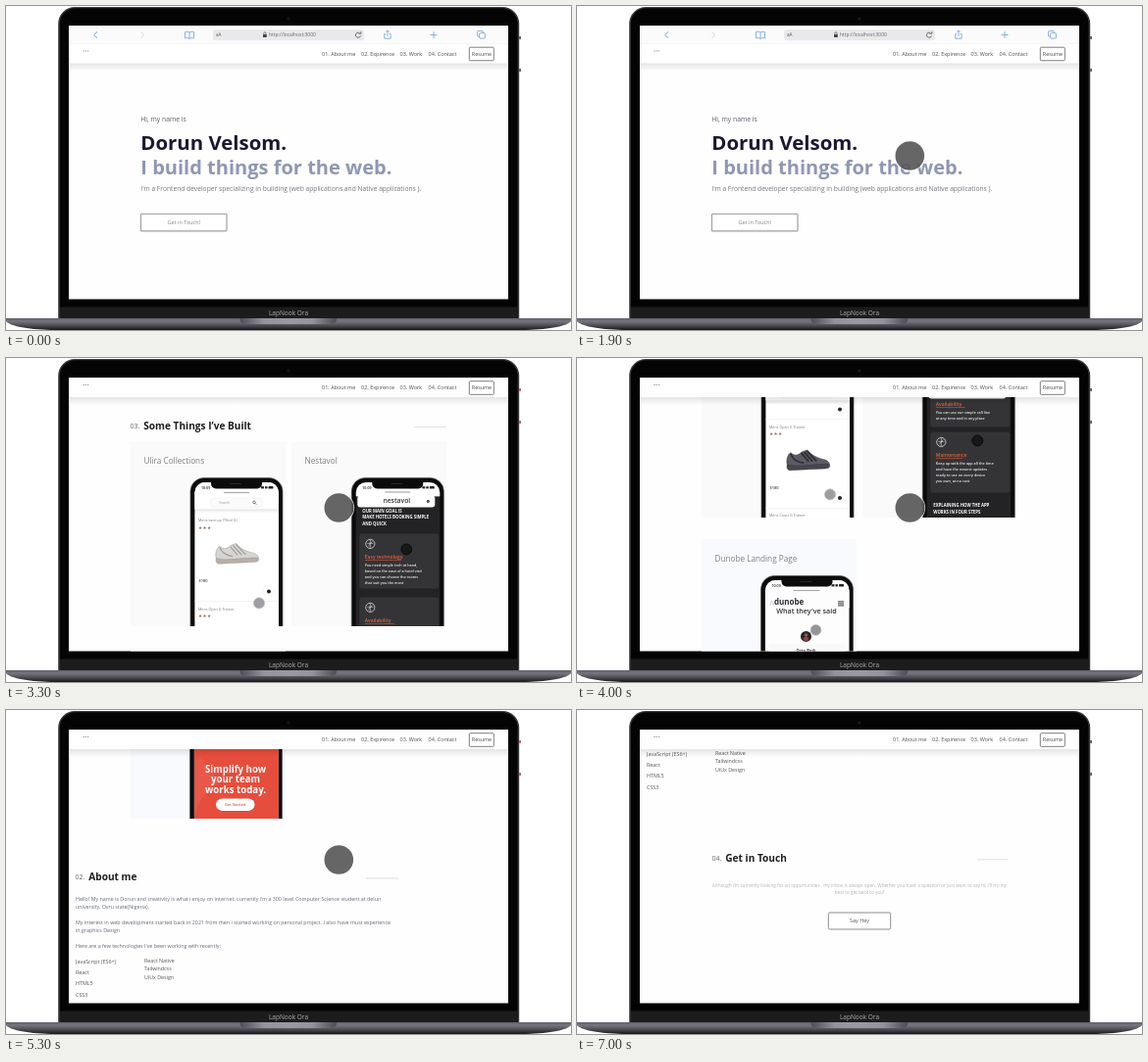
Animation, 576 px wide and 331 px high, one loop 7800 ms. Source, as an HTML page with a canvas:

```html
<!DOCTYPE html>
<html lang="en">
<head>
<meta charset="utf-8">
<title>Portfolio scroll</title>
<style>
html, body { margin: 0; width: 100%; height: 100%; overflow: hidden; background: #fff; }
canvas { display: block; width: 100vw; height: 100vh; filter: blur(0.35px); }
</style>
</head>
<body>
<canvas id="stage"></canvas>
<script>
const W = 576, H = 331, LOOP = 7800, STEP = 100, LAST = 7000;
const canvas = document.getElementById('stage');
const ctx = canvas.getContext('2d');
const scale = window.devicePixelRatio || 1;
canvas.width = W * scale;
canvas.height = H * scale;

// Tracks: [time, value] pairs, linear in between.
const WORK = 280;
const pageScroll = [[2000, 0], [2500, 200], [2600, 200], [3200, WORK], [3400, WORK], [4000, 391],
  [4600, 514], [5300, 654], [5800, 793], [6100, 793], [6400, 866]];
const shopScroll = [[3300, 0], [4000, 75], [4600, 130]];
const hotelScroll = [[3300, 0], [4000, 110]];
const landingScroll = [[4000, 0], [4600, 20], [5300, 90]];
const touchAlpha = [[1400, 0], [1700, 1], [6700, 1], [7000, 0]];

function track(keys, t) {
  if (t <= keys[0][0]) return keys[0][1];
  for (let i = 1; i < keys.length; i++) {
    const [t0, v0] = keys[i - 1], [t1, v1] = keys[i];
    if (t <= t1) return v0 + (v1 - v0) * (t - t0) / (t1 - t0);
  }
  return keys[keys.length - 1][1];
}

function text(str, x, y, size, color = '#666', weight = 400, align = 'left') {
  ctx.font = `${weight} ${size}px "Open Sans", "Noto Sans", sans-serif`;
  ctx.textAlign = align;
  ctx.textBaseline = 'middle';
  ctx.fillStyle = color;
  ctx.fillText(str, x, y);
}
function lines(list, x, y, gap, ...style) {
  list.forEach((str, i) => text(str, x, y + i * gap, ...style));
}
function rect(x, y, w, h, color) {
  ctx.fillStyle = color;
  ctx.fillRect(x, y, w, h);
}
function box(x, y, w, h, r, fill, stroke, width = 1) {
  ctx.beginPath();
  ctx.roundRect(x, y, w, h, r);
  if (fill) { ctx.fillStyle = fill; ctx.fill(); }
  if (stroke) { ctx.strokeStyle = stroke; ctx.lineWidth = width; ctx.stroke(); }
}
function disc(x, y, r, fill, stroke, width = 1) {
  box(x - r, y - r, 2 * r, 2 * r, r, fill, stroke, width);
}
function path(d, color, width = 0.8, fill) {
  const p = new Path2D(d);
  if (fill) { ctx.fillStyle = fill; ctx.fill(p); }
  if (color) { ctx.strokeStyle = color; ctx.lineWidth = width; ctx.stroke(p); }
}
function gradient(x0, y0, x1, y1, ...stops) {
  const g = ctx.createLinearGradient(x0, y0, x1, y1);
  stops.forEach((color, i) => g.addColorStop(i / (stops.length - 1), color));
  return g;
}
function fade(x, y, w, h, from, to) {
  rect(x, y, w, h, gradient(0, y, 0, y + h, from, to));
}
function at(x, y, draw) {
  ctx.save();
  ctx.translate(x, y);
  draw();
  ctx.restore();
}
function clipTo(x, y, w, h, r = 0) {
  ctx.beginPath();
  ctx.roundRect(x, y, w, h, r);
  ctx.clip();
}

function laptop(t) {
  box(53.2, 1, 470, 321, [17, 17, 0, 0], '#3a3a3d');
  box(54.8, 2.2, 466.800, 318, [15.5, 15.5, 0, 0], '#040405');
  disc(288, 13, 1.7, '#17181f');
  rect(55, 307.5, 466.5, 12, '#1c1c1e');
  text('LapNook Ora', 288, 314, 6.5, '#b0b0b2', 400, 'center');

  path('M0 319H576V322C572 327 556 330 530 331H46C20 330 4 327 0 322Z', null, 0,
    gradient(0, 319, 0, 331, '#62616a', '#77767f', '#5c5b63', '#3b3a40', '#17171a'));
  box(238.5, 319, 98.5, 6, [0, 0, 5, 5],
    gradient(238, 0, 337, 0, '#4c4b52', '#94939b', '#9a99a1', '#94939b', '#4c4b52'));

  const red = (t >= 2700 && t < 3500) || (t >= 4300 && t < 5500);
  for (const y of [31, 64]) rect(523.4, y, 1.3, 3, red ? '#a0282d' : '#222');
}

function toolbar(y) {
  at(0, y, () => {
    const blue = '#6f9fd8';
    rect(64, 20, 448, 19, '#fbfbfc');
    path('M93 26.3l-3.3 3.2l3.3 3.2', blue, 1);
    path('M137.5 26.3l3.3 3.2l-3.3 3.2', '#d0d4da', 1);
    path('M187 27v6.5c-1-1-3-1-4.5-.6V26.4c1.5-.4 3.5-.4 4.5.6c1-1 3-1 4.5-.6v6.5c-1.5-.4-3.5-.4-4.5.6', blue);
    box(211, 24, 154, 11.3, 3, '#e9e9ec');
    text('aA', 214, 30.2, 4.6, '#555');
    box(262, 28.9, 3.8, 3, 0.5, '#444');
    path('M262.8 29v-1.2a1.1 1.1 0 0 1 2.2 0v1.2', '#444', 0.6);
    text('http://localhost:3000', 268, 30.2, 4.95, '#666');
    ctx.beginPath();
    ctx.arc(359, 29.7, 2.6, 0.3, 5.3);
    ctx.strokeStyle = '#555';
    ctx.lineWidth = 0.8;
    ctx.stroke();
    path('M361.8 26v2.3h-2.3', '#555', 0.8);
    path('M387 28.5h-1.3v4.7h6.4v-4.7h-1.3M389 31v-6M387.2 26.6l1.8-1.8l1.8 1.8', blue);
    path('M436 26v7M432.5 29.5h7', blue);
    box(480.5, 25.5, 5.8, 5.5, 1, null, blue, 0.8);
    box(482.6, 27.6, 5.8, 5.5, 1, '#fbfbfc', blue, 0.8);
    rect(64, 38.5, 448, 0.6, '#dcdcdf');
  });
}

function navBar(y) {
  at(0, y, () => {
    rect(64, 0, 448, 20, '#fff');
    fade(64, 20, 448, 8, 'rgba(0,0,0,.1)', 'rgba(0,0,0,0)');
    for (let i = 0; i < 3; i++) rect(78.5 + i * 2.2, 7, 1.3, 0.9, '#888');
    const items = [['01. About me', 322], ['02. Expirence', 362], ['03. Work', 401.5], ['04. Contact', 430.5]];
    for (const [label, x] of items) text(label, x, 10.6, 5.5, '#4c4c4c');
    box(472.3, 3.7, 25, 13.6, 1, null, '#707070', 0.9);
    text('Resume', 485, 10.6, 5.4, '#4c4c4c', 400, 'center');
  });
}

function heading(num, title, x, y, ruleX, ruleW, rule) {
  text(num, x, y, 7, '#666');
  text(title, x + 13.8, y, 10.1, '#1d1d20', 700);
  rect(ruleX, y, ruleW, 0.9, rule);
}

function hero() {
  text('Hi, my name is', 137.3, 115.8, 6.8, '#5c5c66');
  text('Dorun Velsom.', 137.3, 141.4, 20.4, '#1c1635', 700);
  text('I build things for the web.', 137.3, 166.6, 20.05, '#9097b3', 700);
  text("I'm a Frontend developer specializing in building (web applications and Native applications ).",
    137.3, 186.8, 6.7, '#74747c');
  box(137.5, 212.5, 87.5, 17.3, 0.5, '#fff', '#a0a0a2', 1.2);
  text('Get in Touch!', 181.3, 221.5, 5.5, '#808080', 400, 'center');
}

// Phone-local coordinates: 94 wide, top left corner at 0, 0.
function phone(x, y, bg, ink, content) {
  at(x, y, () => {
    box(0, 0, 94, 210, 14, '#0b0b0c', '#55555a', 0.7);
    ctx.save();
    clipTo(4.4, 4.6, 85.6, 210, 10.5);
    rect(0, 0, 94, 210, bg);
    content();
    text('10:09', 11, 10.2, 3.6, ink, 600);
    rect(72, 8.8, 3, 2.2, ink);
    rect(76, 8.8, 2.5, 2.2, ink);
    box(79.5, 8.6, 5, 2.6, 0.7, ink);
    ctx.restore();
    box(21, 2, 52, 9, [0, 0, 5, 5], '#0b0b0c');
    rect(40, 5.5, 12, 1, '#2c2c30');
  });
}

function shoe(x, y, dark) {
  const [upper, shade, sole] = dark ? ['#5c5a63', '#2f2e35', '#47464e'] : ['#d7d5d2', '#9a9793', '#b5afa8'];
  at(x, y, () => {
    ctx.rotate(-0.05);
    path('M-21 5C-22 0-20-5-17-7C-13-3-9-4-6-7L0-9C4-3 11 0 18 2C22 4 23 7 21 9H-19Z', shade, 0.5, upper);
    path('M-21 5C-8 9 6 5 22 7C23 10 21 11 18 11H-18C-21 11-22 8-21 5Z', shade, 0.4, sole);
    path('M-6-6L1 3M-3-7L5 3M0-8L9 3M-17-6C-15 0-11 3-4 4', shade, dark ? 1.8 : 1);
  });
}

function shop(s) {
  const names = ['Mens Lace-up (Third G)', 'Mens Open G Trainer', 'Mens Court G Trainer'];
  names.forEach((name, i) => {
    const y = 44 + 90.5 * i - s;
    text(name, 8, y, 3.7, '#777');
    for (let k = 0; k < 3; k++) text('★', 8 + k * 4.5, y + 7, 4.6, '#8b7258');
    shoe(47, y + 32, i % 2 === 1);
    text('$180', 8.5, y + 62, 4, '#444', 600);
    box(74, y + 67, 12, 10, 4, '#fff', '#eee', 0.5);
    disc(80, y + 72, 2, '#222');
    rect(4, y + 82, 87, 0.7, '#eee');
  });
  rect(4, 4, 87, 28, '#fff');
  fade(4, 32, 87, 4, 'rgba(0,0,0,.1)', 'rgba(0,0,0,0)');
  rect(34, 14.5, 26, 1.2, '#aaa');
  box(20, 20.5, 54, 9.5, 4, '#fbfbfb', '#eee', 0.5);
  text('Search', 29, 25.3, 3.6, '#999');
  disc(65, 25, 1.3, null, '#555', 0.7);
  path('M66 26l1.3 1.3', '#555', 0.7);
  disc(70, 128, 5.6, 'rgba(135,135,140,.8)', '#c4c4c6', 0.8);
}

function featureCard(y, h, title, body) {
  box(8, y, 81, h, 3, '#343436');
  disc(19, y + 10.5, 4.6, null, '#ddd', 0.8);
  path(`M16 ${y + 10}h6M19 ${y + 6}v9M17 ${y + 13}l4-5`, '#ddd', 0.6);
  text(title, 13.5, y + 24, 5, '#e2603d', 600);
  rect(13.5, y + 27, title.length * 2.5, 0.5, '#e2603d');
  lines(body, 13.5, y + 33, 6, 3.7, '#eee', 600);
}

function hotel(s) {
  at(0, -s, () => {
    lines(['OUR MAIN GOAL IS', 'MAKE HOTELS BOOKING SIMPLE', 'AND QUICK'], 11, 34, 6.8, 4.3, '#fff', 700);
    featureCard(57, 56, 'Easy technology', ['You need simple tech at hand,', 'based on the ease of a hotel visit',
      'and you can choose the rooms', 'that suit you the most']);
    featureCard(122, 47, 'Availability', ['You can use our simple call line', 'at any time and in any place']);
    featureCard(174, 62, 'Maintenance', ['Keep up with the app all the time', 'and have the newest updates',
      'ready to use on every device', 'you own, at no cost']);
    lines(['EXPLAINING HOW THE APP', 'WORKS IN FOUR STEPS'], 11, 249, 7, 4.3, '#fff', 700);
  });
  rect(4, 4, 87, 15, '#fff');
  rect(34, 14, 26, 1.2, '#aaa');
  box(6, 18, 79, 12, 3, '#fff');
  text('nestavol', 46, 24, 6.8, '#333', 600, 'center');
  disc(78, 24, 1.6, '#555');
  disc(56, 73, 5.4, '#171718', '#0b0b0b', 1);
}

function landing(s, t) {
  const red = '#e64d3c';
  at(0, -s, () => {
    text("What they've said", 46.5, 37, 7.2, '#333', 600, 'center');
    box(8, 69, 78, 40, 2, '#f9f9fa');
    disc(46, 62, 5.5, '#2b2527');
    disc(46, 60.6, 1.8, '#8e5a55');
    box(43.3, 62.5, 5.4, 4, 2, '#9b3f45');
    text('Oren Bask', 46, 76.6, 3.9, '#333', 700, 'center');
    lines(['“We have been able to cancel so many of', 'our other tools since using it. There is',
      "no more confusion and we're all", 'focused on the work”'], 46, 86, 5.1, 3.6, '#777', 400, 'center');
    for (let i = 0; i < 3; i++) disc(43 + i * 3, 118, 0.6, i ? '#e6c5c0' : red);
    box(25, 132, 43, 13, 6.5, 'rgba(230,77,60,.18)');
    box(25, 130.7, 43, 12.5, 6.2, red);
    text('Get Started', 46.5, 137, 3.9, '#fff', 600, 'center');
    rect(0, 160, 94, 140, red);
    path('M4 240Q10 215 30 205L12 180L4 182Z', null, 0, 'rgba(255,255,255,.06)');
    lines(['Simplify how', 'your team', 'works today.'], 46.5, 192, 10.5, 9.7, '#fff', 700, 'center');
    box(26.5, 221, 39.5, 12.5, 6.2, '#fff');
    text('Get Started', 46.3, 227.3, 3.9, red, 600, 'center');
  });
  rect(4, 4, 87, 29, '#fdfdfd');
  rect(33, 14.5, 27, 1.2, '#aaa');
  path('M9 30l2-4l2 4M12 30l1-2', '#bbb', 0.6);
  text('dunobe', 13.5, 27.5, 8, '#2b2b33', 700);
  for (let i = 0; i < 3; i++) rect(78.5, 26 + i * 2, 6, 1, '#333');
  if (t < 5000) disc(track([[4000, 56], [4600, 64]], t), 55.5, 5.4, 'rgba(125,125,128,.8)', '#bbb', 0.7);
}

function card(x, y, title, phoneX, bg, screen, content) {
  ctx.save();
  clipTo(x, y, 158, 189);
  rect(x, y, 158, 189, bg);
  text(title, x + 13.5, y + 21, 8.2, '#808084');
  phone(phoneX, y + 37.4, screen, '#222', content);
  ctx.restore();
}

function work(t) {
  heading('03.', 'Some Things I’ve Built', 126.5, 70, 416.5, 32, '#dedede');
  card(127, 85, 'Ulira Collections', 188, '#fafafa', '#fff', () => shop(track(shopScroll, t)));
  card(291, 85, 'Nestavol', 352.3, '#fafafa', '#232325', () => hotel(track(hotelScroll, t)));
  card(127, 296, 'Dunobe Landing Page', 187.5, '#f9fafd', '#fdfdfd', () => landing(track(landingScroll, t), t));
}

function about() {
  const ink = '#666a78';
  heading('02.', 'About me', 70.5, 545.5, 367, 33, '#d6d6d6');
  lines(["Hello! My name is Dorun and creativity is what i enjoy on internet. currently i'm a 300 level Computer Science student at delun",
    'university, Ovru state(Nigeria).'], 71, 567.2, 8, 5.34, ink);
  lines(['My interest in web development started back in 2021 from then i started working on personal project. I also have must experience',
    'in graphics Design'], 71, 591.2, 8, 5.32, ink);
  text("Here are a few technologies I've been working with recently:", 71, 615.2, 5.32, ink);
  lines(['JavaScript (ES6+)', 'React', 'HTML5', 'CSS3'], 71, 631.4, 11.3, 5.4, '#555');
  lines(['React Native', 'Tailwindcss', 'UiUx Design'], 141, 630.4, 8.5, 5.3, '#555');
}

function contact() {
  heading('04.', 'Get in Touch', 137.5, 738.4, 408, 31, '#dcdcdc');
  lines(["Although i'm currently looking for an oppurtunities , my inbox is always open. Whether you have a question or just want to say hi, i'll try my",
    'best to get back to you!'], 288, 765.4, 7, 4.67, '#b4b4b8', 400, 'center');
  box(256.3, 793, 63.4, 17, 1.5, '#fff', '#808080', 0.9);
  text('Say Hey', 288, 802, 5.5, '#555', 400, 'center');
}

function touch(alpha) {
  if (alpha <= 0) return;
  ctx.globalAlpha = alpha;
  disc(339.3, 153, 15.3, null, 'rgba(255,255,255,.65)', 1.2);
  disc(339.3, 153, 14.8, 'rgba(86,86,86,.9)');
  ctx.globalAlpha = 1;
}

function draw(t) {
  const y = track(pageScroll, t);
  ctx.setTransform(scale, 0, 0, scale, 0, 0);
  rect(0, 0, W, H, '#fff');
  laptop(t);
  ctx.save();
  clipTo(64, 20, 448, 279.5);
  rect(64, 20, 448, 280, '#fefefe');
  at(0, -y, hero);
  at(0, WORK - y, () => { work(t); about(); contact(); });
  toolbar(-y);
  navBar(Math.max(20, 38.5 - y));
  touch(track(touchAlpha, t));
  ctx.restore();
}

const start = performance.now();
function tick() {
  const t = (performance.now() - start) % LOOP;
  draw(Math.min(LAST, Math.floor(t / STEP) * STEP));
  requestAnimationFrame(tick);
}
tick();
</script>
</body>
</html>
```
